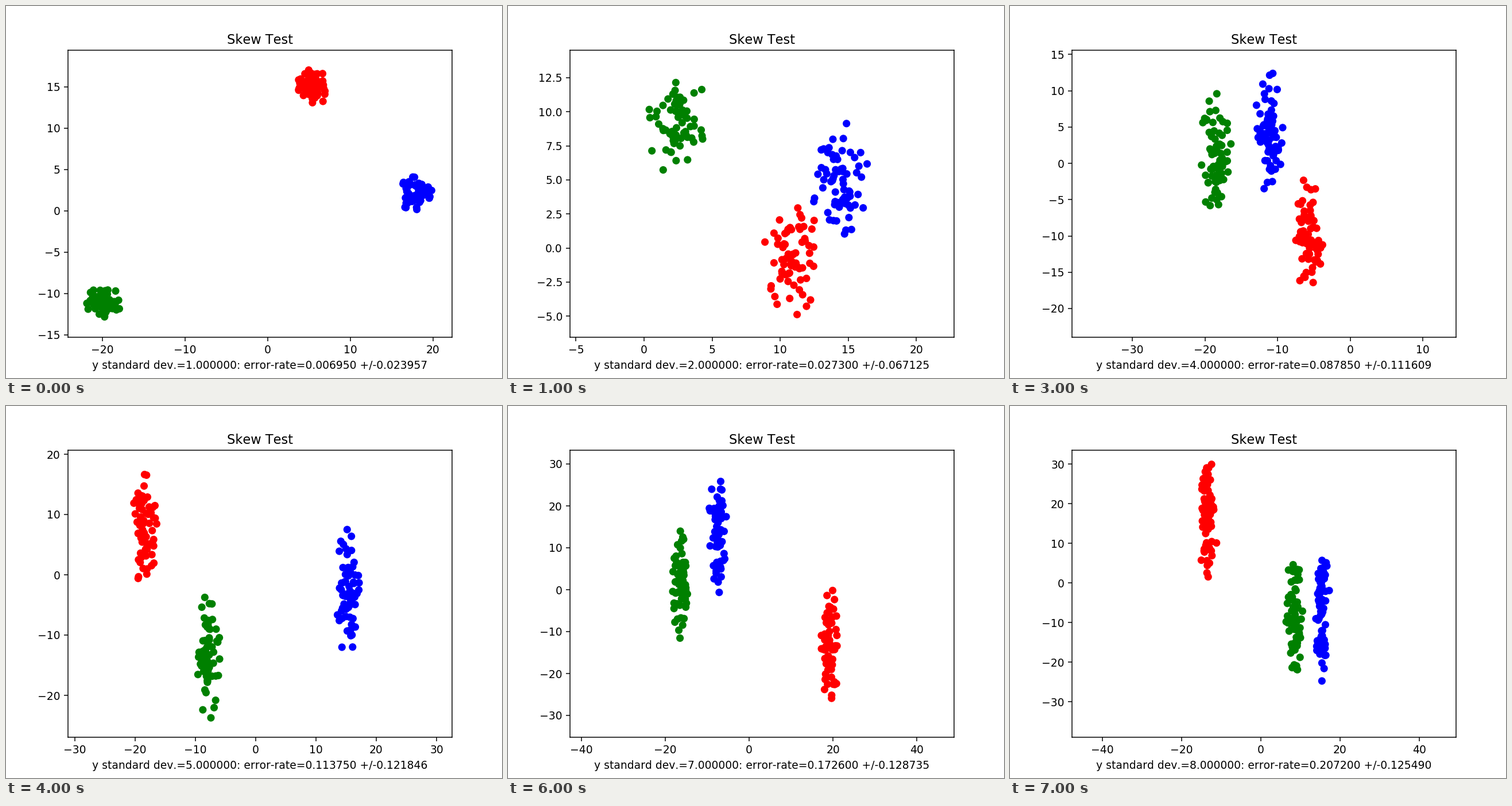
Animation of 864 by 648 pixels, one loop 8 s. Source, as a matplotlib script:

```python
import numpy as np
import matplotlib.pyplot as plt
from matplotlib.animation import FuncAnimation

W, H, DPI = 864, 648, 135
LEFT, RIGHT, TOP, BOTTOM = 108, 777, 77, 577  # axes edges in pixels
COLORS = ["red", "green", "blue"]
PER_CLUSTER = 67
REACH = 2.2  # clouds end at this many standard deviations

plt.rcParams["text.kerning_factor"] = 6
scenes = []


def cloud(rng, center, spread):
    """Gaussian cloud truncated at REACH."""
    angle = rng.uniform(0, 2 * np.pi, PER_CLUSTER)
    cut = 1 - np.exp(-REACH**2 / 2)
    radius = np.sqrt(-2 * np.log(1 - cut * rng.uniform(size=PER_CLUSTER)))
    unit = np.column_stack([np.cos(angle), np.sin(angle)])
    return np.array(center) + unit * radius[:, None] * spread


def add_scene(rate, error, origin, scale, *centers):
    """origin: pixel of data (0, 0); scale: pixels per unit; y spread grows by 1."""
    dev = len(scenes) + 1
    rng = np.random.default_rng(dev)
    points = np.vstack([cloud(rng, c, (1, dev)) for c in centers])
    order = rng.permutation(len(points))
    ox, oy = origin
    scenes.append({
        "label": f"y standard dev.={dev:f}: error-rate={rate:f} +/-{error:f}",
        "points": points[order],
        "colors": np.repeat(COLORS, PER_CLUSTER)[order],
        "xlim": ((LEFT - ox) / scale, (RIGHT - ox) / scale),
        "ylim": ((oy - BOTTOM) / scale, (oy - TOP) / scale),
    })


# Cluster centers in the order red, green, blue
add_scene(0.006950, 0.023957, (455.5, 357), 14.4,
          (5.4, 15.0), (-19.8, -11.1), (18.0, 2.1))
add_scene(0.027300, 0.067125, (237, 421.5), 23.72,
          (10.9, -0.7), (2.4, 9.4), (14.5, 4.8))
add_scene(0.044450, 0.077168, (383.5, 369.6), 11.35,
          (-6.7, 12.7), (-7.4, -8.6), (17.7, 16.2))
add_scene(0.087850, 0.111609, (592.7, 274), 12.65,
          (-5.7, -10.1), (-18.6, 1.6), (-11.2, 4.8))
add_scene(0.113750, 0.121846, (435, 294), 10.5,
          (-18.6, 8.5), (-7.9, -13.4), (15.3, -3.4))
add_scene(0.140300, 0.131082, (394.3, 230), 9.45,
          (2.2, 0.0), (1.6, 2.0), (8.2, -18.6))
add_scene(0.172600, 0.128735, (420, 320), 7.3,
          (19.2, -13.7), (-16.4, 2.7), (-7.5, 14.4))
add_scene(0.207200, 0.125490, (436.5, 308.3), 6.9,
          (-13.2, 14.8), (8.4, -9.0), (15.6, -7.5))

fig = plt.figure(figsize=(W / DPI, H / DPI), dpi=DPI)
ax = fig.add_axes([LEFT / W, 1 - BOTTOM / H, (RIGHT - LEFT) / W, (BOTTOM - TOP) / H])
ax.set_title("Skew Test")
dots = ax.scatter([], [], s=36, linewidths=1)


def draw(i):
    scene = scenes[i]
    dots.set_offsets(scene["points"])
    dots.set_color(scene["colors"])
    ax.set_xlim(scene["xlim"])
    ax.set_ylim(scene["ylim"])
    ax.set_xlabel(scene["label"])
    return [dots]


anim = FuncAnimation(fig, draw, frames=len(scenes), interval=1000,
                     repeat=True, repeat_delay=0, blit=False)
plt.show()
```
